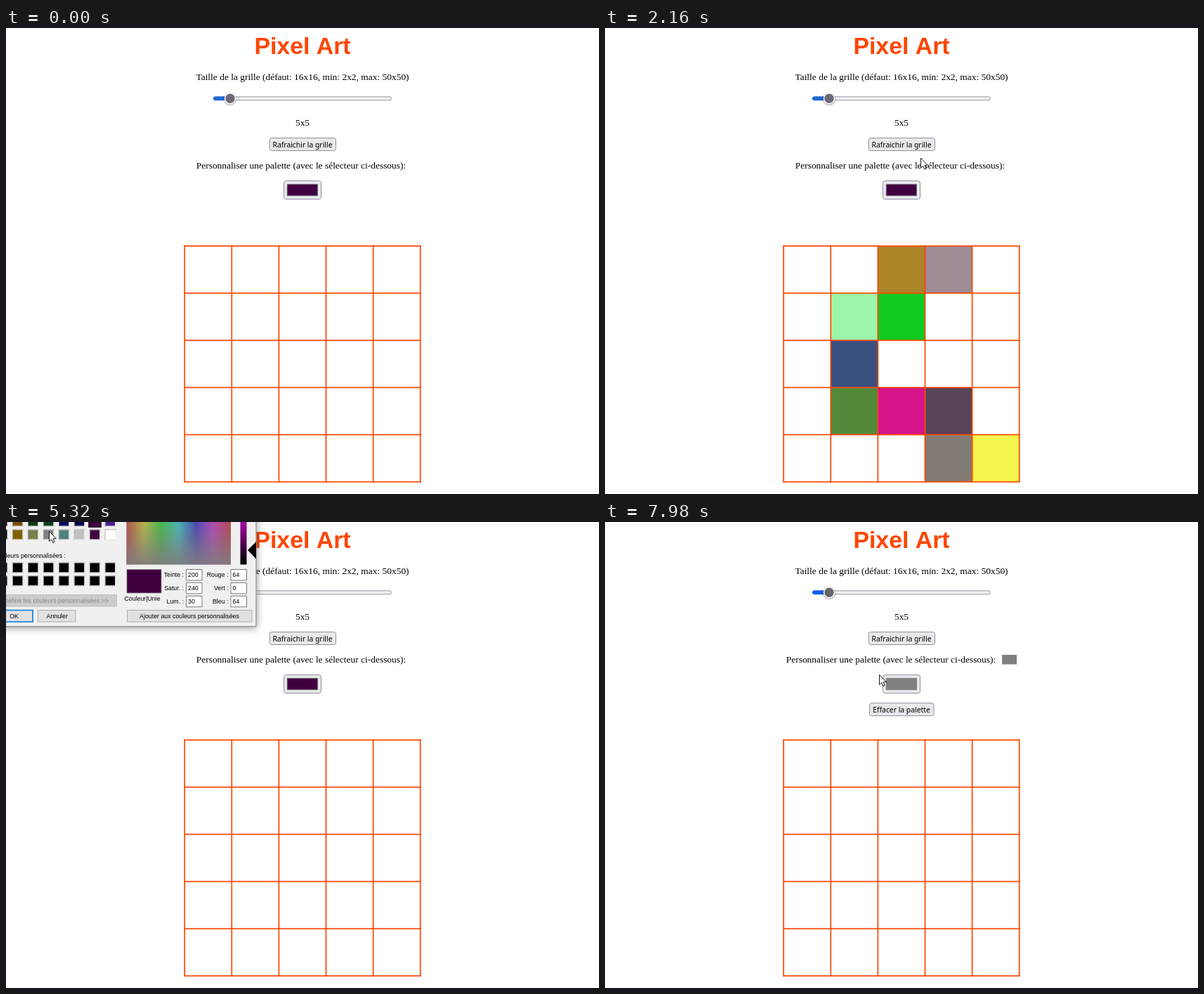
Recreate the animation shown at these times as an HTML page with a canvas. Size 844 by 663 pixels, loop 8 s.

```html
<!DOCTYPE html>
<html lang="fr">
<head>
<meta charset="utf-8">
<title>Pixel Art</title>
<style>
html, body { margin: 0; width: 100%; height: 100%; overflow: hidden; background: #fff; }
canvas { display: block; }
</style>
</head>
<body>
<canvas id="stage" width="844" height="663"></canvas>
<script>
const ctx = document.getElementById('stage').getContext('2d');
const LOOP = 8000, TICK = 78.2, START = 130;
const ORANGE = '#ff4500', PURPLE = '#400040', GREY = '#808080';
const SERIF = '13.44px "Liberation Serif", serif';
const UI = '10.35px "Noto Sans", sans-serif';
const SMALL = '8.8px "Liberation Sans", sans-serif';

// Pointer path: tick, x, y
const path = [
  [0, 718, 612], [2, 575, 634], [3, 510, 608], [4, 476, 562], [5, 446, 546],
  [7, 375, 545], [9, 346, 504], [10, 345, 489], [12, 352, 435], [14, 400, 405],
  [16, 440, 365], [18, 485, 312], [20, 518, 262], [21, 514, 245], [24, 465, 200],
  [26, 433, 169], [40, 433, 169], [45, 423, 233], [48, 423, 233], [52, 418, 262],
  [54, 370, 215], [59, 88, 3], [64, 62, 11], [66, 61, 13], [72, 61, 13],
  [75, 30, 65], [77, 30, 65], [81, 15, 129], [92, 15, 129], [100, 390, 217]
];

// Painted cells: column, row, colour, tick
const cells = [
  [4, 4, '#f5f54e', 2], [3, 4, '#827b73', 3], [3, 3, '#594358', 4],
  [2, 3, '#d61389', 5], [1, 3, '#538a3a', 7], [1, 2, '#3a5180', 9],
  [1, 1, '#9cf5a9', 12], [2, 1, '#10ca20', 14], [2, 0, '#ab8428', 16],
  [3, 0, '#a08c96', 17]
];

// Click halo: tick -> radius
const halos = { 33: 16, 47: 12, 69: 10, 81: 10, 82: 10 };

const rowA = ['#200000', '#7d4e00', '#0b3d10', '#004020', '#000060', '#00004a', PURPLE, '#4a1f90'];
const rowB = ['#000', '#806000', '#7b8050', GREY, '#508080', '#c0c0c0', PURPLE, '#fff'];
const black = Array(8).fill('#000');

function text(s, x, y, font, color = '#000', align = 'center') {
  ctx.font = font;
  ctx.fillStyle = color;
  ctx.textAlign = align;
  ctx.fillText(s, x, y);
}

function rect(x, y, w, h, fill) {
  ctx.fillStyle = fill;
  ctx.fillRect(x, y, w, h);
}

function box(x, y, w, h, fill, stroke, radius = 0, line = 1) {
  ctx.beginPath();
  ctx.roundRect(x, y, w, h, radius);
  ctx.fillStyle = fill;
  ctx.fill();
  ctx.strokeStyle = stroke;
  ctx.lineWidth = line;
  ctx.stroke();
}

function disc(x, y, r, fill) {
  ctx.beginPath();
  ctx.arc(x, y, r, 0, Math.PI * 2);
  ctx.fillStyle = fill;
  ctx.fill();
}

function polygon(points) {
  ctx.beginPath();
  points.forEach(p => ctx.lineTo(...p));
  ctx.closePath();
}

function gradient(x0, y0, x1, y1, stops) {
  const g = ctx.createLinearGradient(x0, y0, x1, y1);
  stops.forEach((c, i) => g.addColorStop(i / (stops.length - 1), c));
  return g;
}

function pointer(k) {
  const i = path.findIndex(p => p[0] >= k);
  if (i < 1) return path[i < 0 ? path.length - 1 : 0].slice(1);
  const [a, ax, ay] = path[i - 1], [b, bx, by] = path[i];
  const u = (k - a) / (b - a);
  return [ax + (bx - ax) * u, ay + (by - ay) * u];
}

function slider(k) {
  const late = k >= 84;
  box(295.5, 97.8, 253, 5, '#efefef', '#8f8f9d', 2.5, 0.9);
  ctx.beginPath();
  ctx.roundRect(295, 97.5, 26, 5.6, 2.8);
  ctx.fillStyle = late ? '#0a60f0' : '#1c6bd6';
  ctx.fill();
  ctx.save();
  ctx.shadowColor = 'rgba(0,0,0,.45)';
  ctx.shadowBlur = 3;
  ctx.shadowOffsetY = 0.8;
  disc(319, 100.3, 8.2, '#fff');
  ctx.restore();
  disc(319, 100.3, 6.7, late ? '#66666c' : '#6c6876');
}

function button(label, x, y, w, hover) {
  box(x, y, w, 18, hover ? '#d0d0d7' : '#e9e9ed', hover ? '#676774' : '#8f8f9d', 3);
  text(label, 422, y + 13.3, UI);
}

function grid(k) {
  const X = i => 254.2 + 67.1 * i, Y = i => 310.2 + 67.1 * i;
  for (const [c, r, color, at] of cells)
    if (k >= at && k < 33) rect(X(c), Y(r), 67.1, 67.1, color);
  for (let i = 0; i < 6; i++) {
    rect(X(i) - 0.85, Y(0) - 0.85, 1.7, 337.2, ORANGE);
    rect(X(0) - 0.85, Y(i) - 0.85, 337.2, 1.7, ORANGE);
  }
}

function page(k) {
  const saved = k >= 84;
  rect(0, 0, 844, 663, '#fff');
  text('Pixel Art', 422, 37.2, 'bold 33.8px "Liberation Sans", sans-serif', ORANGE);
  text('Taille de la grille (défaut: 16x16, min: 2x2, max: 50x50)', 422, 74.3, SERIF);
  slider(k);
  text('5x5', 422, 139.3, SERIF);
  button('Rafraichir la grille', 375.3, 156.5, 94.2, k >= 26 && k <= 41);
  text('Personnaliser une palette (avec le sélecteur ci-dessous):', saved ? 407 : 420, 200.3, SERIF);
  const face = k === 47 ? '#b1b1b9' : k >= 44 && k < 51 ? '#d0d0d7' : '#e9e9ed';
  box(395.5, 217.5, 53, 26, face, '#8f8f9d', 3);
  box(400.2, 222.3, 43.4, 16.4, k >= 69 ? GREY : PURPLE, '#77777f', 0, 0.8);
  if (saved) {
    rect(565, 189, 21, 13.5, GREY);
    button('Effacer la palette', 376.5, 257.7, 91.5, false);
  }
  grid(k);
}

function swatches(colors, y) {
  colors.forEach((c, i) => {
    const x = -12 + 21.95 * i;
    rect(x - 1, y - 1, 15.5, 15, '#a0a0a0');
    rect(x, y, 14.5, 14, '#fff');
    rect(x, y, 13.5, 13, c);
  });
}

function dialogButton(label, x, w, mid, fill = '#e1e1e1', stroke = '#adadad', line = 1) {
  box(x, 125.5, w, 16.5, fill, stroke, 0, line);
  text(label, mid, 137, SMALL);
}

function spectrum() {
  const hues = [...Array(13)].map((_, i) => `hsl(${i * 30},42%,50%)`);
  rect(171.5, 0, 148.5, 60.5, gradient(171, 0, 320, 0, hues));
  rect(171.5, 0, 148.5, 60.5, gradient(0, 0, 0, 60, ['rgba(128,124,126,0)', 'rgba(128,124,126,.92)']));
}

function dialog(k, picked) {
  ctx.save();
  ctx.shadowColor = 'rgba(0,0,0,.4)';
  ctx.shadowBlur = 10;
  ctx.shadowOffsetY = 2;
  rect(-20, -20, 376.5, 169, '#f0f0f0');
  ctx.restore();
  box(-20, -20, 376, 168.7, '#f0f0f0', '#7c7c7c');

  swatches(rowA, -7.5);
  swatches(rowB, 11.5);
  if (picked) box(52.5, 10.5, 17, 15.5, GREY, '#000');
  else box(117.5, -10, 18, 17.5, PURPLE, '#222', 0, 0.9);
  text('Couleurs personnalisées :', 85, 50.5, SMALL, '#000', 'right');
  swatches(black, 58.5);
  swatches(black, 77.3);

  box(-20, 103.5, 177.5, 16.5, '#ccc', '#bfbfbf');
  text('Définir les couleurs personnalisées >>', 146, 115.2, SMALL, '#858585', 'right');
  const over = k >= 80;
  dialogButton('OK', -20, 58, 11.5, over ? '#cce4f7' : '#e1e1e1', over ? '#005499' : '#0078d7', over ? 1 : 1.6);
  dialogButton('Annuler', 45.5, 53.5, 72.7);
  dialogButton('Ajouter aux couleurs personnalisées', 172.5, 177.5, 261);

  spectrum();
  rect(333.5, 0, 9, 60.5, gradient(0, 0, 0, 60, picked ? ['#808080', '#000'] : ['#a808a8', '#500050', '#000']));
  if (picked) {
    rect(270, 52, 3, 4.5, '#000');
    rect(263, 58.7, 5, 2, '#000');
    rect(274.5, 58.7, 5, 2, '#000');
  } else {
    polygon([[344, 40], [356, 28], [356, 52.5]]);
    ctx.fillStyle = '#000';
    ctx.fill();
  }

  box(172, 67.5, 49, 33.5, picked ? GREY : PURPLE, '#8a8a8a', 0, 0.8);
  text('Couleur|Unie', 194, 111.5, SMALL);
  const fields = [
    ['Teinte :', 200, 160, 'Rouge :', 64], ['Satur. :', 240, 0, 'Vert :', 0], ['Lum. :', 30, 120, 'Bleu :', 64]
  ];
  fields.forEach(([a, before, after, b, level], i) => {
    const y = 67.5 + 18.9 * i;
    const entry = (label, x, value) => {
      text(label, x - 3.5, y + 10.8, SMALL, '#000', 'right');
      box(x, y, 22.5, 15.5, '#fff', '#7a7a7a');
      text(value, x + 2.5, y + 10.8, SMALL, '#000', 'left');
    };
    entry(a, 256.5, picked ? after : before);
    entry(b, 320, picked ? 128 : level);
  });
}

function arrow(x, y) {
  ctx.save();
  ctx.translate(x + 0.5, y + 0.5);
  polygon([[0, 0], [0, 14], [3.2, 11.2], [5.3, 16], [7.6, 15], [5.5, 10.3], [9.8, 10]]);
  ctx.fillStyle = '#fff';
  ctx.fill();
  ctx.strokeStyle = '#000';
  ctx.lineWidth = 0.9;
  ctx.stroke();
  ctx.restore();
}

function draw(t) {
  const k = Math.floor((t - START) / TICK);
  page(k);

  const fade = { 51: 0.55, 52: 0.93, 83: 0.6, 84: 0.2 };
  if (k >= 51 && k < 85) {
    ctx.save();
    ctx.globalAlpha = fade[k] ?? 1;
    if (ctx.globalAlpha < 1) ctx.translate(-0.7, -0.7);
    dialog(k, k >= 69);
    ctx.restore();
  }

  if (k < 0) return;
  const [x, y] = pointer(k);
  if (halos[k]) disc(x - 1, y + 1, halos[k], 'rgba(238,232,20,.75)');
  arrow(x, y);
}

function loop() {
  draw(performance.now() % LOOP);
  requestAnimationFrame(loop);
}
loop();
</script>
</body>
</html>
```
